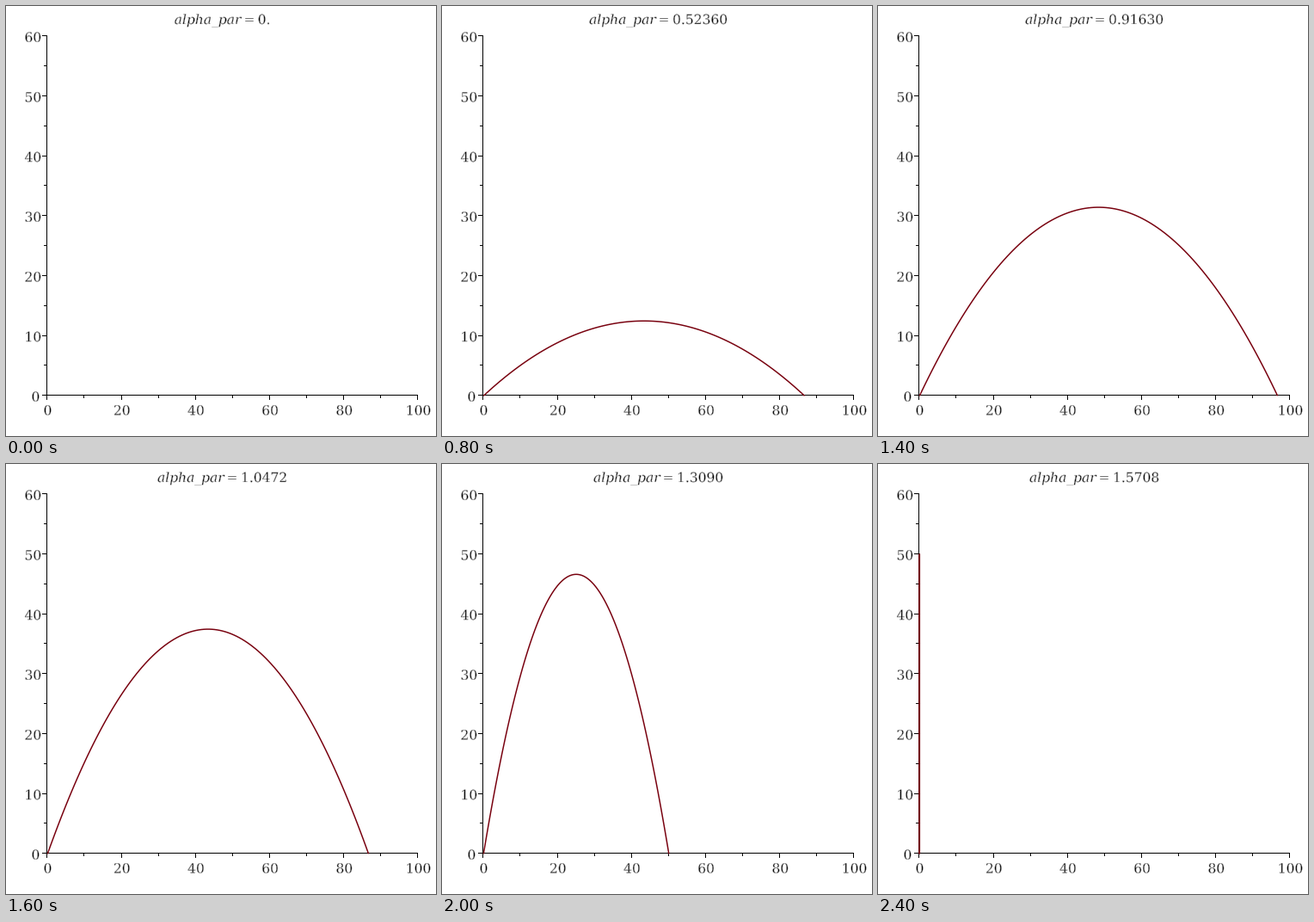
Recreate the animation shown at these times as a matplotlib script. Size 500 by 500 pixels, loop 2500 ms.

```python
from math import floor

import numpy as np
import matplotlib.pyplot as plt
from matplotlib.animation import FuncAnimation
from matplotlib.patheffects import Normal, Stroke

SIZE, DPI, FRAMES = 500, 100, 25
PX = 72 / DPI                  # points per pixel
FONT = 15.5                    # text size in pixels
X0, Y0 = 47.8, 452.8           # plot origin
SX, SY = 431 / 100, 418 / 60   # pixels per unit
REACH = 100                    # v^2 / g

fig = plt.figure(figsize=(SIZE / DPI, SIZE / DPI), dpi=DPI, facecolor="white")
ax = fig.add_axes([0, 0, 1, 1])
ax.set_xlim(0, SIZE)
ax.set_ylim(SIZE, 0)
ax.axis("off")


def label(x, y, text="", **kw):
    thin = [Normal(), Stroke(linewidth=0.45 * PX, foreground="white")]
    return ax.text(x, y, text, family="DejaVu Serif", size=FONT * PX,
                   color="black", va="baseline", path_effects=thin, **kw)


def rule(x1, y1, x2, y2):
    ax.plot([x1, x2], [y1, y2], color="black", lw=PX, snap=False,
            solid_capstyle="butt", zorder=2)


def draw_axes():
    left, bottom = floor(X0), floor(Y0)
    right, top = floor(X0 + 100 * SX), floor(Y0 - 60 * SY)
    rule(left + 0.5, top, left + 0.5, bottom + 1)
    rule(left, bottom + 0.5, right + 1, bottom + 0.5)
    for v in range(0, 101, 10):
        x, major = X0 + v * SX, v % 20 == 0
        rule(floor(x) + 0.5, bottom, floor(x) + 0.5, bottom + (6 if major else 4))
        if major:
            label(x + 0.7, 475.6, str(v), ha="center")
    for v in range(0, 61, 5):
        y, major = Y0 - v * SY, v % 10 == 0
        rule(left - (5 if major else 3), floor(y) + 0.5, left + 1, floor(y) + 0.5)
        if major:
            label(37.5 - 8 * len(str(v)), y + 7, str(v))


draw_axes()
curve, = ax.plot([], [], color="#78000e", lw=1.5 * PX, zorder=3,
                 solid_capstyle="butt", solid_joinstyle="round", snap=False)
name = label(0, 21, "alpha_par", style="italic")
equals = label(0, 21, "=")
value = label(0, 21)
s = np.linspace(0, 1, 120)


def update(i):
    a = i * np.pi / 2 / (FRAMES - 1)
    x = REACH * np.sin(2 * a) * s
    y = 2 * REACH * np.sin(a) ** 2 * s * (1 - s)
    curve.set_data(X0 + 0.5 + x * SX, Y0 + 0.5 - y * SY)

    text = f"{a:#.5g}" if i else "0."
    value.set_text(text)
    width = 97 + FONT * (0.636 * (len(text) - 1) + 0.318)
    left = 251.6 - width / 2
    for part, dx in ((name, 0), (equals, 80.7), (value, 97)):
        part.set_x(left + dx)
    return curve, name, equals, value


anim = FuncAnimation(fig, update, frames=FRAMES, interval=100,
                     repeat=True, repeat_delay=0)
plt.show()
```
